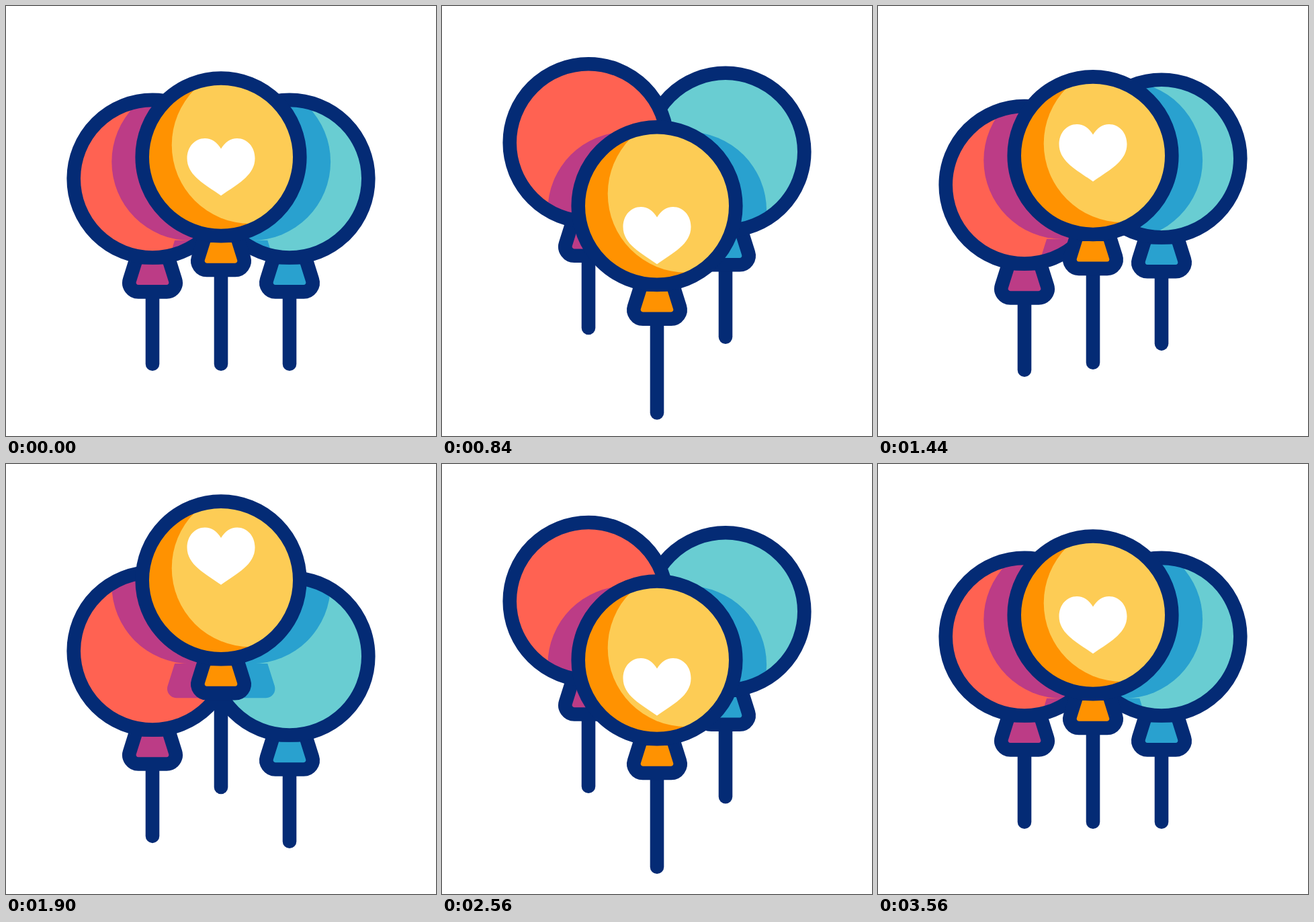
Animation, 640 px wide and 640 px high, one loop 3600 ms. Source, as an HTML page:

```html
<!DOCTYPE html>
<html lang="en">
<head>
<meta charset="utf-8">
<title>Balloons</title>
<style>
  html, body { margin: 0; width: 100%; height: 100%; overflow: hidden; background: #fff; }
  svg { display: block; width: 100%; height: 100%; }
  .line { stroke: #042b75; stroke-width: 20.6; stroke-linecap: round; stroke-linejoin: round; }
</style>
</head>
<body>
<svg viewBox="0 0 640 640">
  <defs>
    <!-- Everything is drawn around the balloon centre -->
    <circle id="ball" r="117.3"/>
    <path id="knot" d="M-23.5 117 L-34 150.4 a13.6 13.6 0 0 0 13 17.8 h42 a13.6 13.6 0 0 0 13 -17.8 L23.5 117 z"/>
    <g id="shape"><use href="#ball"/><use href="#knot"/></g>
    <clipPath id="inside"><circle r="113"/></clipPath>
  </defs>

  <g id="blue" fill="none">
    <path class="line" d="M0 170 V275.5"/>
    <use href="#knot" class="line" fill="#29a1cf"/>
    <use href="#ball" fill="#69cdd2"/>
    <g clip-path="url(#inside)"><use id="blueShade" href="#shape" fill="#29a1cf"/></g>
    <use href="#ball" class="line"/>
  </g>

  <g id="red" fill="none">
    <path class="line" d="M0 170 V275.5"/>
    <use href="#knot" class="line" fill="#bc3c86"/>
    <use href="#ball" fill="#ff6252"/>
    <g clip-path="url(#inside)"><use id="redShade" href="#shape" fill="#bc3c86"/></g>
    <use href="#ball" class="line"/>
  </g>

  <g id="gold" fill="none">
    <path class="line" d="M0 170 V308"/>
    <use href="#knot" class="line" fill="#ff9201"/>
    <use href="#ball" fill="#ff9201"/>
    <g clip-path="url(#inside)"><use href="#ball" x="44" y="-18" fill="#fdcc55"/></g>
    <use href="#ball" class="line"/>
    <path id="heart" fill="#fff" d="M0 -12.3 C-6 -22 -14 -27.8 -24 -27.8 C-39 -27.8 -50.5 -15 -50.5 2 C-50.5 28 -23 41 0 57.5 C23 41 50.5 28 50.5 2 C50.5 -15 39 -27.8 24 -27.8 C14 -27.8 6 -22 0 -12.3 z"/>
  </g>
</svg>
<script>
  const LOOP = 3600;
  const times = {
    red: [0, 855, 1735, 2508, 3258],
    gold: [0, 928, 1836, 2687, 3448],
    blue: [213, 1149, 1995, 2778, 3535]
  };
  const sway = {
    red: [0, -53.7, 31.2, -53.7, 0],
    gold: [0, 74.6, -54, 74.6, 0],
    blue: [0, -53.7, 32, -53.7, 0],
    heart: [0, 30, -52, 30, 0]
  };

  // Eased interpolation between keyframes
  function at(t, keys, values) {
    if (t <= keys[0]) return values[0];
    for (let i = 1; i < keys.length; i++) {
      if (t < keys[i]) {
        const s = (t - keys[i - 1]) / (keys[i] - keys[i - 1]);
        return values[i - 1] + (values[i] - values[i - 1]) * s * s * (3 - 2 * s);
      }
    }
    return values[values.length - 1];
  }

  const move = (id, x, y) =>
    document.getElementById(id).setAttribute('transform', `translate(${x} ${y})`);

  function draw(now) {
    const t = now % LOOP;
    const gold = 224.8 + at(t, times.gold, sway.gold);
    const red = 257.2 + at(t, times.red, sway.red);
    const blue = 257.2 + at(t, times.blue, sway.blue);

    move('gold', 320, gold);
    move('heart', 0, at(t, times.gold, sway.heart));
    move('red', 218, red);
    move('blue', 422, blue);
    // The front balloon casts its shape on the two behind it
    move('redShade', 56.6, gold + 7 - red);
    move('blueShade', -56.2, gold + 7 - blue);
  }

  const start = performance.now();
  function tick() {
    draw(performance.now() - start);
    requestAnimationFrame(tick);
  }
  tick();
</script>
</body>
</html>
```
